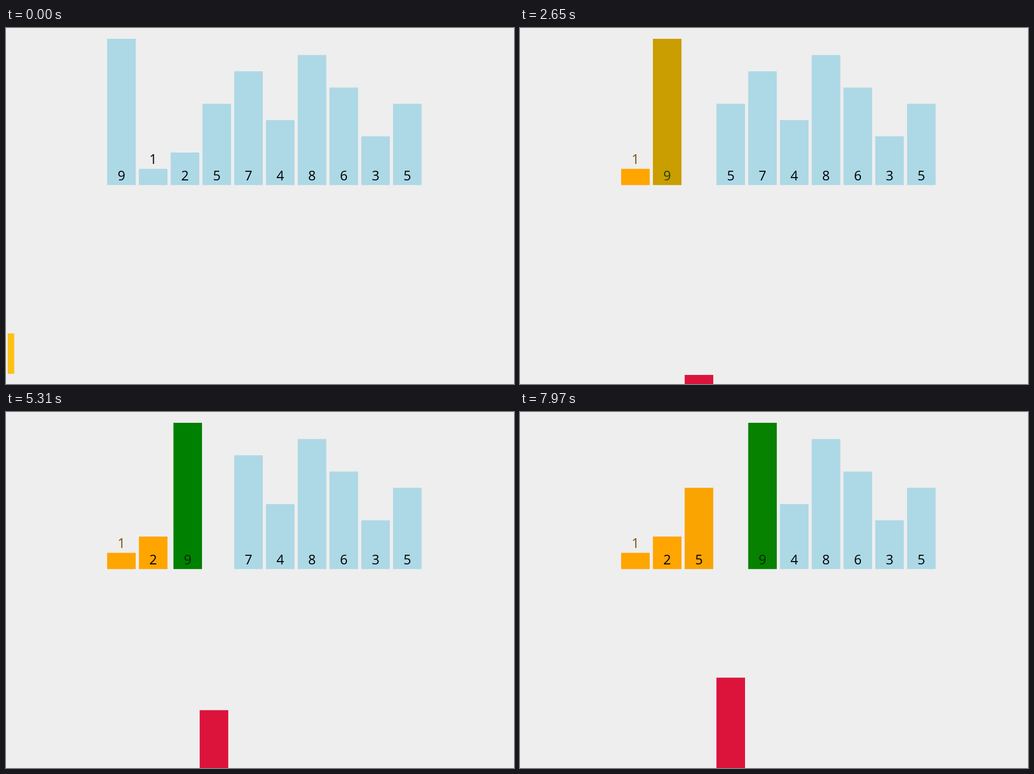
Animation, 894 px wide and 626 px high, one loop 8000 ms. Source, as an HTML page with a canvas:

```html
<!DOCTYPE html>
<html lang="en">
<head>
<meta charset="utf-8">
<title>Insertion sort</title>
<style>
  html, body { margin: 0; height: 100%; overflow: hidden; background: #eee; }
  canvas { display: block; }
</style>
</head>
<body>
<canvas id="stage" width="894" height="626"></canvas>
<script>
const ctx = document.getElementById('stage').getContext('2d');

const LOOP = 8000, FADE = 250, FIRST = 20, SECOND = 321, STEP = 447.3;
const LEFT = 178, PITCH = 55.9, WIDTH = 50.3, BASE = 276.2, UNIT = 28.58, DROP = 391;
const BLUE = [173, 216, 230], ORANGE = [255, 165, 0], GREEN = [0, 128, 0], RED = [220, 20, 60];
const INK = [0, 0, 0], BROWN = [125, 75, 0], MOSS = [35, 75, 0], DARK = [0, 36, 0];

const values = [9, 1, 2, 5, 7, 4, 8, 6, 3, 5];
const steps = sortSteps();

// Runs the insertion sort and keeps a snapshot of all bars after each step.
function sortSteps() {
  const bars = values.map((value, slot) => ({ value, slot, drop: 0, color: BLUE, ink: INK }));
  const order = [...bars];
  const list = [];
  const save = () => list.push(bars.map(bar => ({ ...bar })));
  const paint = (bar, color) => {
    bar.color = color;
    if (bar.value === 9) bar.ink = color === GREEN ? DARK : MOSS;
    if (bar.value === 1 && color === ORANGE) bar.ink = BROWN;
  };

  save();
  paint(order[0], ORANGE);
  save();
  for (let i = 1; i < order.length; i++) {
    const picked = order[i];
    paint(picked, RED);
    picked.drop = DROP;
    save();
    for (let j = i - 1; j >= 0; j--) {
      const other = order[j];
      if (j + 2 <= i) paint(order[j + 2], ORANGE);
      paint(other, GREEN);
      save();
      if (other.value <= picked.value) break;
      order[j] = picked;
      order[j + 1] = other;
      picked.slot = j;
      other.slot = j + 1;
      save();
    }
    picked.drop = 0;
    order.slice(0, i + 1).forEach(bar => paint(bar, ORANGE));
    save();
  }
  return list;
}

const ease = t => t < 0.5 ? 4 * t ** 3 : 1 - 4 * (1 - t) ** 3;
const mix = (a, b, p) => a + (b - a) * p;
const blend = (a, b, p) => `rgb(${a.map((v, i) => Math.round(mix(v, b[i], p)))})`;

function drawBar(from, to, p) {
  const x = LEFT + PITCH * mix(from.slot, to.slot, p);
  const bottom = BASE + mix(from.drop, to.drop, p);
  const height = UNIT * to.value;
  ctx.fillStyle = blend(from.color, to.color, p);
  ctx.fillRect(x, bottom - height, WIDTH, height);
  ctx.fillStyle = blend(from.ink, to.ink, p);
  const lift = to.value === 1 ? height : 0;
  ctx.fillText(to.value, x + WIDTH / 2, bottom - lift - 8.3);
}

function draw(time) {
  ctx.fillStyle = '#eee';
  ctx.fillRect(0, 0, 894, 626);
  if (time < 170) {
    ctx.fillStyle = '#fbc117';
    ctx.fillRect(3, 537, 11.5, 71);
  }

  const index = time < SECOND ? 1 : 2 + Math.floor((time - SECOND) / STEP);
  const start = index === 1 ? FIRST : SECOND + (index - 2) * STEP;
  const p = ease(Math.min(1, Math.max(0, (time - start) / FADE)));
  ctx.font = '23.5px "Open Sans", "Noto Sans", sans-serif';
  ctx.textAlign = 'center';
  steps[index].forEach((bar, i) => drawBar(steps[index - 1][i], bar, p));
}

function tick() {
  draw(performance.now() % LOOP);
  requestAnimationFrame(tick);
}
tick();
</script>
</body>
</html>
```
